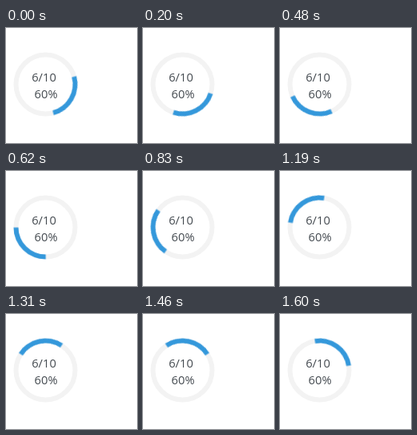
Recreate the animation shown at these times as an HTML page. Size 164 by 144 pixels, loop 1.67 s.

```html
<!DOCTYPE html>
<html lang="en">
<head>
<meta charset="utf-8">
<title>Progress ring</title>
<style>
  html, body { margin: 0; width: 100%; height: 100%; overflow: hidden; background: #fff; }
  svg { display: block; width: 164px; height: 144px; }
  .ring { fill: none; stroke-width: 6; }
  .track { stroke: #f3f3f3; }
  .arc { stroke: #3498db; transform-origin: 49.5px 70.5px; }
  text { font: 14.7px "Open Sans", "Noto Sans", sans-serif; fill: #444a50; }
</style>
</head>
<body>
<svg viewBox="0 0 164 144">
  <circle class="ring track" cx="49.5" cy="70.5" r="37"/>
  <path class="ring arc" id="arc" d="M49.5 33.5 a37 37 0 0 1 37 37"/>
  <text x="32.2" y="67">6/10</text>
  <text x="35.6" y="88">60%</text>
</svg>
<script>
  const LOOP = 1670, STEPS = 24, HOLD = 70;
  // Steps held for a different time than HOLD, in ms
  const holds = { 2: 60, 15: 80, 17: 60, 18: 60, 19: 80 };
  // [step, degrees]: the spin is linear between these
  const turns = [[0, 75], [3, 108], [7, 156], [12, 215], [15, 255], [23, 351]];

  function angleAt(step) {
    const i = Math.max(1, turns.findIndex(([s]) => s >= step));
    const [s0, a0] = turns[i - 1], [s1, a1] = turns[i];
    return a0 + (a1 - a0) * (step - s0) / (s1 - s0);
  }

  const frames = [];
  let time = 0;
  for (let i = 0; i < STEPS; i++) {
    frames.push({
      offset: time / LOOP,
      transform: `rotate(${angleAt(i)}deg)`,
      easing: 'steps(1, end)'
    });
    time += holds[i] || HOLD;
  }
  frames.push({ offset: 1, transform: frames[STEPS - 1].transform });

  document.getElementById('arc').animate(frames, { duration: LOOP, iterations: Infinity });
</script>
</body>
</html>
```
